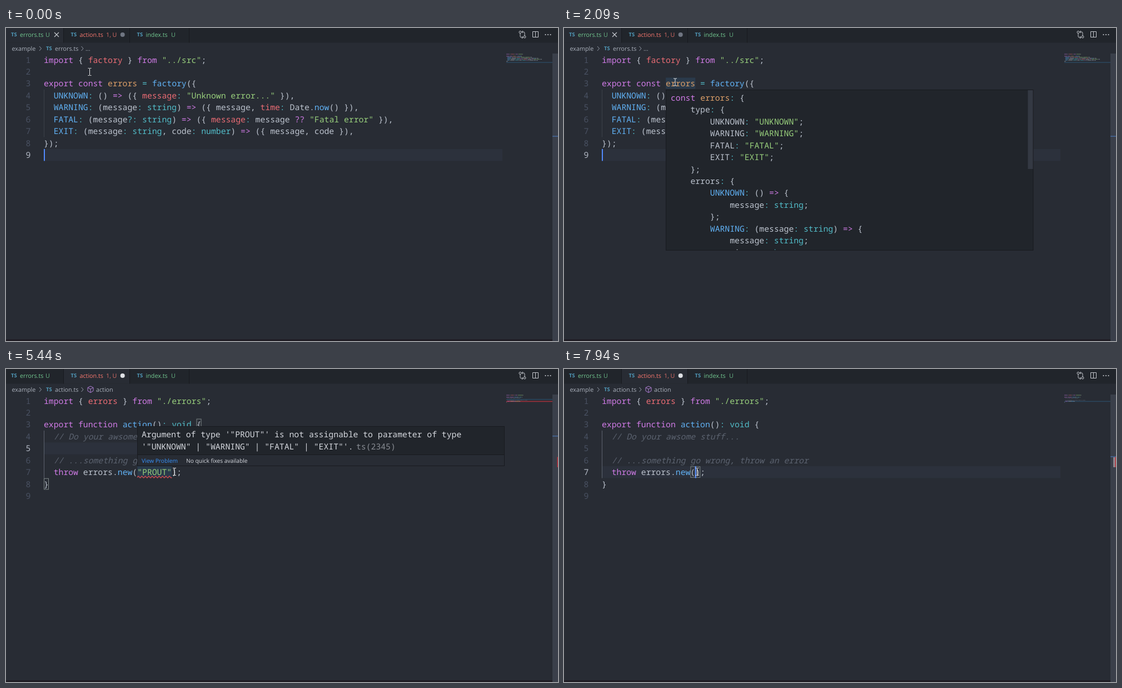
An HTML page that plays this animation: 993 px wide and 564 px high, repeating every 8000 ms.

```html
<!DOCTYPE html>
<html lang="en">
<head>
<meta charset="utf-8">
<title>Typed errors in the editor</title>
<style>
  html, body { margin: 0; width: 100%; height: 100%; overflow: hidden; background: #282c34; }
  svg { display: block; }
  text { white-space: pre; text-rendering: geometricPrecision; }
  .code { font: 500 14.76px "Noto Sans Mono", "DejaVu Sans Mono", monospace; }
  .ui { font: 500 10.75px "Open Sans", "Noto Sans", sans-serif; }
  .small { font: 500 10.2px "Open Sans", "Noto Sans", sans-serif; }
  .ts { font: bold 9.4px "Open Sans", "Noto Sans", sans-serif; fill: #519aba; }
  .icon { fill: none; stroke: #c5c8ce; }
</style>
</head>
<body>
<script>
const LOOP = 8000, CW = 8.856, LH = 21.43, LEFT = 68, TOP = 46.6;
const COLORS = {
  p: '#d07be6', r: '#ea6c74', w: '#bcc3ce', g: '#98cf7c', m: '#d6d9df',
  c: '#52bcc8', b: '#61b2f5', o: '#dc9f68', k: '#5c6370'
};

// "~x" switches to colour x.
const ERRORS = [
  '~pimport~w { ~rfactory~w } ~pfrom~w ~g"../src"~w;',
  '',
  '~pexport const~w ~oerrors~w ~c=~w ~bfactory~w({',
  '  ~bUNKNOWN~c:~w () ~p=>~w ({ ~rmessage~c:~w ~g"Unknown error..."~w }),',
  '  ~bWARNING~c:~w (message~c: string~w) ~p=>~w ({ message, ~rtime~c:~w Date.~bnow~w() }),',
  '  ~bFATAL~c:~w (message~c?: string~w) ~p=>~w ({ ~rmessage~c:~w message ~p??~w ~g"Fatal error"~w }),',
  '  ~bEXIT~c:~w (message~c: string~w, code~c: number~w) ~p=>~w ({ message, code }),',
  '});',
  ''
];
const ACTION = [
  '~pimport~w { ~rerrors~w } ~pfrom~w ~g"./errors"~w;',
  '',
  '~pexport function~w ~baction~w()~c: void~w {',
  '  ~k// Do your awsome stuff...',
  '',
  '  ~k// ...something go wrong, throw an error',
  '',
  '}'
];
const THROW = arg => `  ~pthrow~w errors.~bnew~w(~g${arg}~w);`;
const TYPE_INFO = [
  '~pconst~w ~oerrors~c:~w {',
  '    type~c:~w {',
  ...['UNKNOWN', 'WARNING', 'FATAL', 'EXIT'].map(n => `        ${n}~c:~w ~g"${n}"~w;`),
  '    };',
  '    errors~c:~w {',
  '        ~bUNKNOWN~c:~w () ~p=>~w {',
  '            message~c: string~w;',
  '        };',
  '        ~bWARNING~c:~w (message~c: string~w) ~p=>~w {',
  '            message~c: string~w;',
  '            time~c: number~w;'
];

function el(tag, attrs, parent, text) {
  const n = document.createElementNS('http://www.w3.org/2000/svg', tag);
  for (const k in attrs) n.setAttribute(k, attrs[k]);
  if (text !== undefined) n.textContent = text;
  if (parent) parent.append(n);
  return n;
}
const group = parent => el('g', {}, parent);
const rect = (parent, x, y, width, height, fill, more) =>
  el('rect', { x, y, width, height, fill, ...more }, parent);
const label = (parent, x, y, text, fill, cls = 'ui') =>
  el('text', { x, y, fill, class: cls }, parent, text);
const path = (parent, d, more) => el('path', { d, class: 'icon', ...more }, parent);
const show = (n, on) => { n.style.display = on ? '' : 'none'; };
const colX = c => LEFT + c * CW;
const lineY = l => TOP + (l - 1) * LH;
const mapY = l => 46.6 + (l - 1) * 1.84;

const tokens = src => ('~w' + src).split('~').slice(1).map(s => [s[0], s.slice(1)]);

function codeText(parent, x, y, src) {
  const t = el('text', { x, y, class: 'code' }, parent);
  for (const [k, s] of tokens(src)) {
    if (s) el('tspan', { fill: COLORS[k], 'font-style': k === 'k' ? 'italic' : 'normal' }, t, s);
  }
}

// A code line together with its trace in the minimap.
function codeLine(parent, line, src) {
  codeText(parent, LEFT, lineY(line) + 16, src);
  let col = 0;
  for (const [k, s] of tokens(src)) {
    for (const m of s.matchAll(/\S+/g)) {
      rect(parent, 900 + (col + m.index) * 0.9, mapY(line), m[0].length * 0.9, 1.1, COLORS[k], { opacity: 0.5 });
    }
    col += s.length;
  }
}

function bracket(parent, line, col) {
  rect(parent, colX(col) + 0.5, lineY(line) + 0.7, 8, 19.6, 'none', { stroke: '#7b8484' });
}

function hoverBox(x, y, w, h) {
  const g = group(stage);
  rect(g, x + 0.5, y + 0.5, w - 1, h - 1, '#21252b', { stroke: '#181a1f' });
  return g;
}

const stage = el('svg', { width: 993, height: 564, viewBox: '0 0 993 564' }, document.body);
rect(stage, 0, 0, 993, 564, '#282c34');

// Editor backgrounds
const activeLine = rect(stage, LEFT, 0, 825, LH, '#2c313c');
const wordA = rect(stage, colX(13), lineY(3), 6 * CW, 20, '#2a3a4b');
const wordB = rect(stage, colX(19), lineY(7), 7 * CW, 20.5, '#2a3a4b');
const selection = rect(stage, 0, lineY(7), 0, LH, '#3e4451');
const guide = rect(stage, LEFT, lineY(4), 1, LH * 4, '#3b4048');

// Line numbers
const numbers = [];
for (let i = 1; i <= 9; i++) numbers.push(label(stage, 35.5, lineY(i) + 16, i, '#495162', 'code'));

// Minimap cursor line and overview ruler
rect(stage, 0, 561, 983, 3, '#1f1c23');
rect(stage, 983, 46, 10, 518, '#3a3f4a');
const mapLine = rect(stage, 900, 0, 83, 1.5, '#2b475f');
const mapError = rect(stage, 900, mapY(7), 83, 1.6, '#a2303a');
const mapSpot = rect(stage, 917, mapY(7), 7, 1.6, '#c04048');
const rulerLine = rect(stage, 983, 0, 10, 1.6, '#46689a');
const rulerBrackets = rect(stage, 988, 159, 4, 18, '#8d838b');
const rulerError = rect(stage, 991.5, 158.5, 1.5, 18.5, '#b8303a');

// Documents
const docA = group(stage), docB = group(stage);
ERRORS.forEach((s, i) => codeLine(docA, i + 1, s));
ACTION.forEach((s, i) => codeLine(docB, i + 1, s));
const withArg = group(docB), noArg = group(docB);
codeLine(withArg, 7, THROW('"PROUT"'));
codeLine(noArg, 7, THROW(''));
let wave = `M${colX(19)} 195.5`;
for (let i = 0; i < 10; i++) wave += 'q1.55 -4 3.1 -1.2t3.1 1.2';
path(withArg, wave, { style: 'stroke:#f14c4c', 'stroke-width': 1.1 });
const braces = group(docB), parens = group(docB), emptyParens = group(docB);
bracket(braces, 3, 31);
bracket(braces, 8, 0);
bracket(parens, 7, 18);
bracket(parens, 7, 26);
bracket(emptyParens, 7, 18);
bracket(emptyParens, 7, 19);

const caret = rect(stage, 0, 0, 2, LH, '#528bff');

// Type information popup
const hoverA = hoverBox(183, 111, 661.5, 290);
const clip = el('svg', { x: 184, y: 112, width: 660, height: 288 }, hoverA);
TYPE_INFO.forEach((s, i) => codeText(clip, 8, 19 + i * LH, s));
rect(hoverA, 834.5, 112, 9, 142, '#343943');

// Problem popup
const hoverB = hoverBox(236, 103, 661, 72);
rect(hoverB, 237, 155, 659, 19, '#282c34');
rect(hoverB, 237, 154, 659, 1, '#181a1f');
codeText(hoverB, 244, 123, `~mArgument of type '"PROUT"' is not assignable to parameter of type`);
codeText(hoverB, 244, 144.5, `~m'"UNKNOWN" | "WARNING" | "FATAL" | "EXIT"'.`);
label(hoverB, 630, 144.5, 'ts(2345)', '#888c93', 'code');
label(hoverB, 244, 169, 'View Problem', '#3794ff', 'small');
label(hoverB, 324, 169, 'No quick fixes available', '#d6d9df', 'small');

// Tab bar
const TABS = [
  [0, 104, 'errors.ts', 'U', 71, '#73c991'],
  [104, 119, 'action.ts', '1, U', 180, '#f8786f'],
  [223, 107, 'index.ts', 'U', 297, '#73c991']
];
rect(stage, 0, 0, 993, 26.5, '#21252b');
const tabs = TABS.map(([x, w, name, mark, markX, color], i) => {
  const bg = rect(stage, x, 0, w, 26.5, '#282c34');
  const left = [9, 116.5, 235.5][i];
  rect(stage, x + w - 1, 0, 1, 26.5, '#181a1f');
  label(stage, left, 15, 'TS', '', 'ts');
  label(stage, left + 16, 16, name, color);
  label(stage, markX, 16, mark, color).setAttribute('opacity', 0.85);
  return bg;
});
const close = path(stage, 'M87 8l8 8M95 8l-8 8', { 'stroke-width': 1.2 });
const dirty = el('circle', { cx: 209.7, cy: 12, r: 4 }, stage);

// Editor actions
path(stage, 'M925 9.5V15q0 2 2 2h3M928 15l2.2 2-2.2 2M933 14V9q0-2-2-2h-3M930 5l-2.2 2 2.2 2');
for (const [cx, cy] of [[925, 7.5], [933, 16]]) el('circle', { cx, cy, r: 2, class: 'icon' }, stage);
path(stage, 'M947.5 6.5h10v10h-10zM952.5 6.5v10');
for (const cx of [970.5, 975, 979.5]) el('circle', { cx, cy: 12, r: 1.1, fill: '#c5c8ce' }, stage);

// Breadcrumbs
const DIM = '#abb1bc';
label(stage, 10.5, 41, 'example', DIM);
path(stage, 'M60 33l3.5 4-3.5 4M135.5 33l3.5 4-3.5 4', { style: 'stroke:#9299a5' });
label(stage, 72, 40, 'TS', '', 'ts');
const crumbA = group(stage), crumbB = group(stage);
label(crumbA, 88, 41, 'errors.ts', DIM);
label(crumbA, 143, 41, '...', DIM);
label(crumbB, 88, 41, 'action.ts', DIM);
label(crumbB, 162, 41, 'action', DIM);
path(crumbB, 'M152 31l5 2.5v6l-5 3-5-3v-6zM147 33.5l5 2.7 5-2.7M152 36.2v6', { style: 'stroke:#b180d7' });

// Pointer
const press = el('circle', { r: 10.5, fill: '#c8b90f', opacity: 0.75 }, stage);
const beam = path(stage, 'M-3-6.5h2q1 0 1 1 0-1 1-1h2M0-5.5v11M-3 6.5h2q1 0 1-1 0 1 1 1h2', { style: 'stroke:#e4e4e4' });
const hand = path(stage,
  'M-1 1q0-1.5 1.2-1.5t1.3 1.5v5l5 1q1.5.4 1.3 2l-.8 5.5h-6.5l-4-5q-.5-1.5 1-1.3l1.5 1.3z',
  { style: 'fill:#fff;stroke:#111;stroke-width:.8' });

// Times: pointer as [ms, x, y]; caret as [ms, visible].
const MOVES = [
  [0, 150.5, 79], [170, 150.5, 79], [800, 200, 97.5], [2090, 200, 97.5], [2780, 160, 11],
  [3370, 160, 11], [3880, 277, 179], [5160, 277, 179], [5440, 303, 185], [5560, 303, 186],
  [5900, 303, 186], [6610, 239, 186], [LOOP, 239.5, 185]
];
const BLINKS = [
  [0, 1], [170, 0], [630, 1], [1130, 0], [1630, 1], [2130, 0], [2630, 1], [3370, 0], [3850, 1],
  [4350, 0], [4830, 1], [5330, 0], [5810, 1], [7160, 0], [7640, 1]
];
const SWITCH = 2920, DOWN = 5810, DELETE = 7640;

function pointer(t) {
  const i = MOVES.findIndex(m => t < m[0]);
  const [t0, x0, y0] = MOVES[i - 1], [t1, x1, y1] = MOVES[i];
  const u = (t - t0) / (t1 - t0), e = u * u * (3 - 2 * u);
  return [x0 + (x1 - x0) * e, y0 + (y1 - y0) * e];
}
const within = (t, a, b) => t >= a && t < b;

function popup(n, t, ...spans) {
  const span = spans.find(([a, b]) => within(t, a, b));
  show(n, span);
  if (span) n.style.opacity = Math.min(1, (t - span[0] + 40) / 120);
}

function render(t) {
  const [x, y] = pointer(t);
  const second = t >= SWITCH, clicked = t >= DOWN, deleted = t >= DELETE;
  const line = !second ? 9 : clicked ? 7 : 5;
  const start = !clicked || deleted ? 26 : Math.max(19, Math.min(26, Math.round((x - LEFT) / CW)));
  const selected = start < 26;

  show(docA, !second);
  show(docB, second);
  show(crumbA, !second);
  show(crumbB, second);
  show(close, !second);
  tabs.forEach((bg, i) => show(bg, i === (second ? 1 : 0)));
  dirty.setAttribute('fill', second ? '#dfe1e5' : '#6f7581');
  guide.setAttribute('fill', second ? '#5c626d' : '#3b4048');
  numbers.forEach((n, i) => n.setAttribute('fill', i + 1 === line ? '#b4bac6' : '#495162'));

  show(withArg, !deleted);
  show(noArg, deleted);
  show(braces, !clicked);
  show(parens, clicked && !selected && !deleted);
  show(emptyParens, deleted);

  activeLine.setAttribute('y', lineY(line));
  show(activeLine, !selected);
  show(selection, selected);
  selection.setAttribute('x', colX(start));
  selection.setAttribute('width', (26 - start) * CW);
  caret.setAttribute('x', line === 7 ? colX(deleted ? 19 : start) - 0.5 : LEFT);
  caret.setAttribute('y', lineY(line));
  show(caret, BLINKS.filter(b => b[0] <= t).pop()[1]);

  mapLine.setAttribute('y', mapY(line));
  rulerLine.setAttribute('y', 46.5 + (line - 1) * 18.58 - 0.8);
  show(mapError, within(t, 3400, DOWN));
  show(mapSpot, clicked && !deleted);
  show(rulerError, t >= 3400);
  show(rulerBrackets, deleted);

  popup(hoverA, t, [1170, 2370]);
  popup(hoverB, t, [4120, 5500], [7360, DELETE]);
  show(wordA, within(t, 1170, 2370));
  show(wordB, within(t, 4120, 5500));

  const at = `translate(${x} ${y})`;
  const overText = y > 46;
  show(press, within(t, 2840, 2960) || within(t, DOWN, 6930));
  press.setAttribute('transform', `translate(${x - 1} ${y - 0.5})`);
  beam.setAttribute('transform', at);
  hand.setAttribute('transform', at);
  show(beam, overText);
  show(hand, !overText);
}

function tick() {
  render(performance.now() % LOOP);
  requestAnimationFrame(tick);
}
tick();
</script>
</body>
</html>
```
